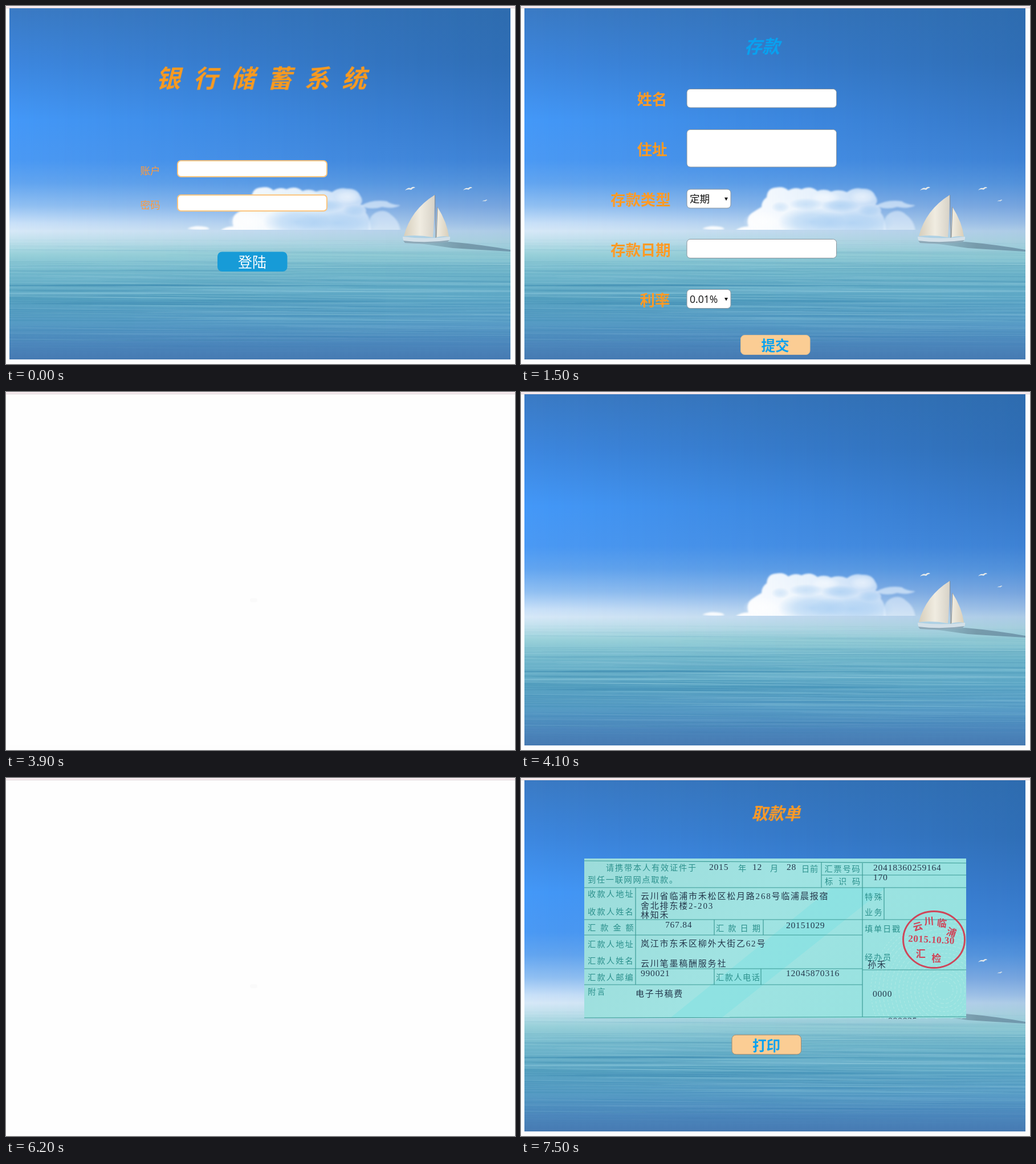
An HTML page with a canvas that plays this animation: 893 by 627 pixels, repeating every 8 s.

```html
<!DOCTYPE html>
<html lang="zh-CN">
<head>
<meta charset="utf-8">
<title>银行储蓄系统</title>
<style>
html, body { margin: 0; width: 100%; height: 100%; overflow: hidden; background: #fdfdfd; }
.bar { position: absolute; left: 0; top: 0; width: 100%; height: 3px; background: #f8ecf0; border-bottom: 1px solid #ddd2d6; }
canvas, svg { position: absolute; left: 0; top: 0; }
text { font-family: "Open Sans", "Noto Sans CJK SC", "Noto Sans CJK", sans-serif; white-space: pre; }
.typed { font-family: "Liberation Serif", "Noto Sans CJK SC", "Noto Sans CJK", serif; }
.page, #blank { animation: 8s step-end infinite; }
#login { animation-name: login; }
#deposit { animation-name: deposit; }
#withdraw { animation-name: withdraw; }
#slip { animation-name: slip; }
#blank { animation-name: blank; }
@keyframes login { 0% { opacity: 1 } 6.25%, 100% { opacity: 0 } }
@keyframes deposit { 0% { opacity: 0 } 18.75% { opacity: 1 } 35%, 100% { opacity: 0 } }
@keyframes withdraw { 0% { opacity: 0 } 62.5% { opacity: 1 } 77.5%, 100% { opacity: 0 } }
@keyframes slip { 0% { opacity: 0 } 93.75%, 100% { opacity: 1 } }
@keyframes blank {
  0%, 7.5%, 18.75%, 37.5%, 51.25%, 62.5%, 78.75%, 93.75%, 100% { opacity: 0 }
  6.25%, 16.25%, 35%, 48.75%, 61.25%, 77.5%, 92.5% { opacity: 1 }
}
</style>
</head>
<body>
<div class="bar"></div>
<canvas id="sea" width="893" height="627"></canvas>
<svg width="893" height="627" viewBox="0 0 893 627">
  <defs>
    <linearGradient id="paper" x2="1" y2=".3">
      <stop offset="0" stop-color="#9cdcda"/>
      <stop offset=".5" stop-color="#a0e3e2"/>
      <stop offset="1" stop-color="#97e2e0"/>
    </linearGradient>
    <clipPath id="edge"><rect x="111" y="141" width="670" height="281"/></clipPath>
  </defs>
  <g id="login" class="page"></g>
  <g id="deposit" class="page"></g>
  <g id="withdraw" class="page"></g>
  <g id="slip" class="page"></g>
  <g id="blank">
    <rect x="6" y="4" width="879" height="615" fill="#fefefe"/>
    <rect x="428" y="361" width="13" height="7" rx="3" fill="#fafafa"/>
  </g>
</svg>
<script>
const $ = id => document.getElementById(id);
const ORANGE = '#ff9a24', BLUE = '#08a2f0', PEACH = '#fbcd94', TEAL = '#2c918d', INK = '#24384c';

let seed = 7;
const rnd = (a = 0, b = 1) => {
  seed = (seed * 16807) % 2147483647;
  return a + (b - a) * seed / 2147483647;
};

// ---------- seascape ----------
const c = $('sea').getContext('2d');

// y, colour at the left edge, colour at the right edge
const BANDS = [
  [4, [58, 122, 196], [46, 108, 175]],
  [100, [60, 134, 222], [47, 110, 182]],
  [200, [67, 152, 248], [54, 120, 200]],
  [270, [74, 153, 244], [62, 130, 212]],
  [310, [98, 165, 240], [82, 145, 218]],
  [350, [145, 192, 242], [118, 164, 222]],
  [380, [200, 224, 248], [152, 188, 228]],
  [394, [214, 232, 247], [172, 203, 230]],
  [412, [192, 224, 236], [166, 206, 222]],
  [435, [152, 208, 217], [144, 201, 212]],
  [470, [112, 182, 203], [110, 180, 202]],
  [510, [90, 164, 194], [92, 166, 197]],
  [555, [86, 155, 196], [88, 156, 198]],
  [590, [76, 135, 188], [76, 135, 188]],
  [619, [70, 122, 178], [70, 122, 178]]
];

function backdrop() {
  for (let x = 6; x < 885; x++) {
    const u = (x - 6) / 879, g = c.createLinearGradient(0, 4, 0, 619);
    for (const [y, l, r] of BANDS)
      g.addColorStop((y - 4) / 615, `rgb(${l.map((v, i) => Math.round(v + (r[i] - v) * u))})`);
    c.fillStyle = g;
    c.fillRect(x, 4, 1, 615);
  }
}

// Long thin swells, widest in the middle distance
function ripples() {
  for (let i = 0; i < 260; i++) {
    const d = rnd(), y = 410 + d * 195, w = rnd(250, 800), x = rnd(0, 893);
    const near = Math.sin(Math.PI * d), h = 0.5 + near * rnd(0.3, 1);
    const a = (0.03 + near * 0.13) * rnd(0.5, 1);
    c.fillStyle = rnd() < 0.5 ? `rgba(190,232,240,${a})` : `rgba(30,110,155,${a})`;
    c.beginPath();
    c.ellipse(x, y, w / 2, h, rnd(-0.004, 0.012), 0, 7);
    c.fill();
  }
}

function puff(x, y, rx, ry, a, rgb = '255,255,255') {
  c.save();
  c.translate(x, y);
  c.scale(rx, ry);
  const g = c.createRadialGradient(0, 0, 0, 0, 0, 1);
  g.addColorStop(0, `rgba(${rgb},${a})`);
  g.addColorStop(0.5, `rgba(${rgb},${a * 0.7})`);
  g.addColorStop(1, `rgba(${rgb},0)`);
  c.fillStyle = g;
  c.fillRect(-1, -1, 2, 2);
  c.restore();
}

function shape(d, fill) {
  c.fillStyle = fill;
  c.fill(new Path2D(d));
}

function fade(x0, x1, ...colors) {
  const g = c.createLinearGradient(x0, 0, x1, 0);
  colors.forEach((v, i) => g.addColorStop(i / (colors.length - 1), v));
  return g;
}

function clouds() {
  const sky = '150,196,240';
  c.save();
  c.beginPath();
  c.rect(290, 305, 420, 87);
  c.clip();
  c.filter = 'blur(1.6px)';
  shape(`M376 394 Q384 386 399 386 Q394 370 406 362 Q415 356 422 352 Q422 341 431 335
    Q432 319 447 318 Q461 315 469 323 Q481 316 492 321 Q508 314 520 324 Q533 319 544 325
    Q558 320 572 326 Q584 317 598 320 Q616 319 621 332 Q628 340 622 348 Q634 353 631 362
    Q640 372 640 394Z`, fade(400, 640, 'rgba(255,255,255,.95)', 'rgba(250,253,255,.86)', 'rgba(235,245,255,.62)'));
  shape('M622 350 Q642 338 668 342 Q676 348 692 349 Q680 356 660 352 Q640 358 622 350Z', 'rgba(240,248,255,.6)');
  shape('M636 394 Q634 370 648 362 Q664 354 676 366 Q690 376 692 394Z', 'rgba(240,248,255,.5)');
  shape('M318 390 Q330 384 344 386 Q356 387 357 391 Q338 394 318 390Z', 'rgba(255,255,255,.9)');
  c.filter = 'none';
  puff(510, 378, 60, 26, 0.6, sky);
  puff(580, 380, 75, 24, 0.6, sky);
  puff(560, 350, 34, 12, 0.55, sky);
  puff(500, 347, 30, 11, 0.4, sky);
  puff(612, 358, 22, 10, 0.45, sky);
  puff(455, 352, 16, 10, 0.3, sky);
  puff(425, 377, 36, 18, 0.6);
  puff(600, 334, 24, 13, 0.5);
  puff(535, 335, 26, 10, 0.5);
  c.restore();
}

function boat() {
  shape('M712 414 L780 413 Q835 418 885 427 V430 Q830 427 784 424 Z',
    fade(715, 885, 'rgba(105,140,155,.25)', 'rgba(100,132,150,.7)', 'rgba(95,130,155,.7)'));
  shape('M752 331 Q752 370 749 405 Q722 400 698 403 Q710 357 752 331Z', fade(700, 753, '#d8d0be', '#f0ece1', '#d6d1c6'));
  shape('M757 352 Q774 379 777 404 Q766 402 755 405Z', fade(755, 778, '#f1eee4', '#d8cdb8'));
  c.strokeStyle = '#8f8a80';
  c.lineWidth = 0.9;
  c.stroke(new Path2D('M752.5 331 L754 406 M757 352 L755 405'));
  shape('M696 404 Q738 409 779 404 Q780 409 776 412 Q736 417 700 414 Q696 410 696 404Z', '#d3e0e8');
  shape('M697 411 Q738 416 778 410 L775 413 Q738 418 700 415Z', '#8ea9b8');
}

function bird(x, y, s) {
  shape(`M${x - 9 * s} ${y + 3 * s} Q${x - 4 * s} ${y - 3 * s} ${x + s} ${y - s}
    Q${x + 5 * s} ${y - 5 * s} ${x + 9 * s} ${y - 2 * s}
    Q${x + 4 * s} ${y - s} ${x + 2 * s} ${y + 2 * s} Q${x - 4 * s} ${y} ${x - 9 * s} ${y + 3 * s}Z`, '#e6eaea');
}

c.beginPath();
c.rect(6, 4, 879, 615);
c.clip();
backdrop();
ripples();
clouds();
boat();
bird(709, 320, 1);
bird(810, 320, 0.9);
bird(840, 341, 0.5);

// ---------- forms ----------
// cy is the middle of the glyphs
const text = (s, x, cy, size, fill, { bold, gap = 0, slant = 0, typed, turn = 0 } = {}) =>
  `<text ${typed ? 'class="typed"' : ''} transform="translate(${x} ${cy + size * 0.375}) rotate(${turn}) skewX(${-slant})"
    font-size="${size}" fill="${fill}" font-weight="${bold || 400}" letter-spacing="${gap}">${s}</text>`;

const box = (x, y, w, h, { r = 6, fill = '#fff', line = '#8b949c', lw = 1 } = {}) =>
  `<rect x="${x}" y="${y}" width="${w}" height="${h}" rx="${r}" fill="${fill}" stroke="${line}" stroke-width="${lw}"/>`;

const title = (s, x, cy, size, fill, gap = 0) => text(s, x, cy, size, fill, { bold: 700, slant: 14, gap });
const label = (s, x, cy) => text(s, x, cy, 26.4, ORANGE, { bold: 700 });
const button = (s, x, y, line = '#a08a70') =>
  box(x, y, 121.5, 34, { r: 7, fill: PEACH, line }) + text(s, x + 36, y + 18.3, 24.6, BLUE, { bold: 700 });
const select = (s, y) =>
  box(291, y, 77, 33) + text(s, 296, y + 16.5, 17.6, '#111') +
  `<path d="M357 ${y + 14.5}h6l-3 5.5z" fill="#111"/>`;

const field = y => box(301, y, 262, 28, { line: '#fbc580', lw: 2 });
$('login').innerHTML =
  title('银行储蓄系统', 263, 127, 43, '#f99a1f', 22.2) +
  text('账户', 235.5, 288, 17.6, '#ff9a3c') + field(271) +
  text('密码', 235.5, 348, 17.6, '#ff9a3c') + field(331) +
  box(371, 430.5, 122.5, 34.5, { r: 8, fill: '#179bd7', line: 'none' }) +
  text('登陆', 407, 449, 25, '#fff');

$('deposit').innerHTML =
  title('存款', 392, 70.5, 31, BLUE) +
  label('姓名', 203.5, 163.5) + box(291, 145.5, 262.5, 32.5) +
  label('住址', 203.5, 251.5) + box(291, 216.5, 262.5, 65.5) +
  label('存款类型', 157, 339) + select('定期', 321) +
  label('存款日期', 157, 427) + box(291, 408.5, 262.5, 33) +
  label('利率', 208.5, 515) + select('0.01%', 496.5) +
  button('提交', 385.5, 576.5, '#e5bf8f');

$('withdraw').innerHTML =
  title('取款', 394, 70.5, 28.6, BLUE) +
  label('账户', 207, 237) + box(322, 219.5, 262.5, 32) +
  label('密码', 211, 311) + box(322, 291.5, 262.5, 32) +
  button('提交', 352.5, 443.5);

// ---------- withdrawal slip ----------
const print = (s, x, cy, pitch = 16.4) => text(s, x, cy, 14.2, TEAL, { gap: pitch - 14.2 });
const han = (s, x, cy) => text(s, x, cy, 15, INK, { gap: 1.8, typed: 1, bold: 500 });
const num = (s, x, cy) => text(s, x, cy, 15.6, INK, { gap: 0.75, typed: 1 });

const rules = `M111 145L781 149 M111 192H781 M527 148V192 M527 170H781 M599 149V418 M201 192V362
  M111 248H781 M111 275H599 M111 334H599 M599 336H781 M111 362H599 M111 420L781 418
  M339 248V275 M425 248V275 M339 334V362 M421 334V362 M637 192V248`;

function rosette() {
  let s = '';
  for (let r = 16; r < 130; r += 7)
    s += `<circle cx="742" cy="372" r="${r}" stroke-dasharray="${3 + r % 4} 3"/>`;
  return `<g fill="none" stroke="#c2efe9" stroke-width="1.4" opacity=".4">${s}</g>`;
}

function stamp() {
  const red = '#d5354b';
  const arc = (s, from, step, turn) => [...s].map((ch, i) => {
    const a = from + step * i, t = a * Math.PI / 180;
    return text(ch, 724 + Math.cos(t) * 34 - 8.5, 283 + Math.sin(t) * 33, 17, red, { bold: 700, turn: turn * (a + 90) * 0.3 });
  }).join('');
  return `<g opacity=".9"><ellipse cx="724.5" cy="283" rx="54" ry="49.5" fill="none" stroke="${red}" stroke-width="3"/>` +
    arc('云川临浦', -140, 37, 1) + arc('检汇', 82, 50, 0) +
    text('2015.10.30', 679, 280, 17, red, { bold: 700, typed: 1, gap: 0.5, turn: 3 }) + '</g>';
}

$('slip').innerHTML =
  title('取款单', 404.5, 61.5, 28.6, ORANGE) +
  `<g clip-path="url(#edge)">
    <rect x="111" y="141" width="670" height="279.5" fill="url(#paper)"/>
    <path d="M262 420L545 192H640L352 420Z" fill="#7be0e2" opacity=".45"/>
    ${rosette()}
    <path d="${rules}" fill="none" stroke="#3c9c97" stroke-width="1.2"/>` +
  print('请携带本人有效证件于', 149, 156.5, 16) + num('2015', 330, 155) +
  print('年', 381, 158) + num('12', 406, 155.5) + print('月', 437, 158) +
  num('28', 466, 155.5) + print('日前', 492, 159, 15) +
  print('到任一联网网点取款。', 117, 178, 15.9) +
  print('汇票号码', 532.5, 159, 16) + num('20418360259164', 618, 156) +
  print('标识码', 533, 181, 24) + num('170', 618, 173.5) +
  print('收款人地址', 117, 202.5) + han('云川省临浦市禾松区松月路268号临浦晨报宿', 210, 206.5) +
  han('舍北排东楼2-203', 210, 223) +
  print('收款人姓名', 117, 234) + han('林知禾', 210, 239.5) +
  print('汇款金额', 117, 261.5, 22.2) + num('767.84', 253, 256.5) +
  print('汇款日期', 342, 262.5, 21.3) + num('20151029', 465, 257) +
  print('汇款人地址', 117, 290.5) + han('岚江市东禾区柳外大街乙62号', 210, 289.5) +
  print('汇款人姓名', 117, 320) + han('云川笔墨稿酬服务社', 210, 324.5) +
  print('汇款人邮编', 117, 348.5) + num('990021', 210, 341.5) +
  print('汇款人电话', 342, 349, 15.7) + num('12045870316', 465, 341.5) +
  print('附言', 117, 374) + han('电子书稿费', 201, 377) +
  print('特殊', 603, 208) + print('业务', 603, 235) +
  print('填单日戳', 603, 263.5, 16) + print('经办员', 603, 314, 16) +
  han('孙禾', 608, 326) + num('0000', 617, 377) +
  num('000025', 644, 424.5) + stamp() + '</g>' +
  button('打印', 370, 450);
</script>
</body>
</html>
```
